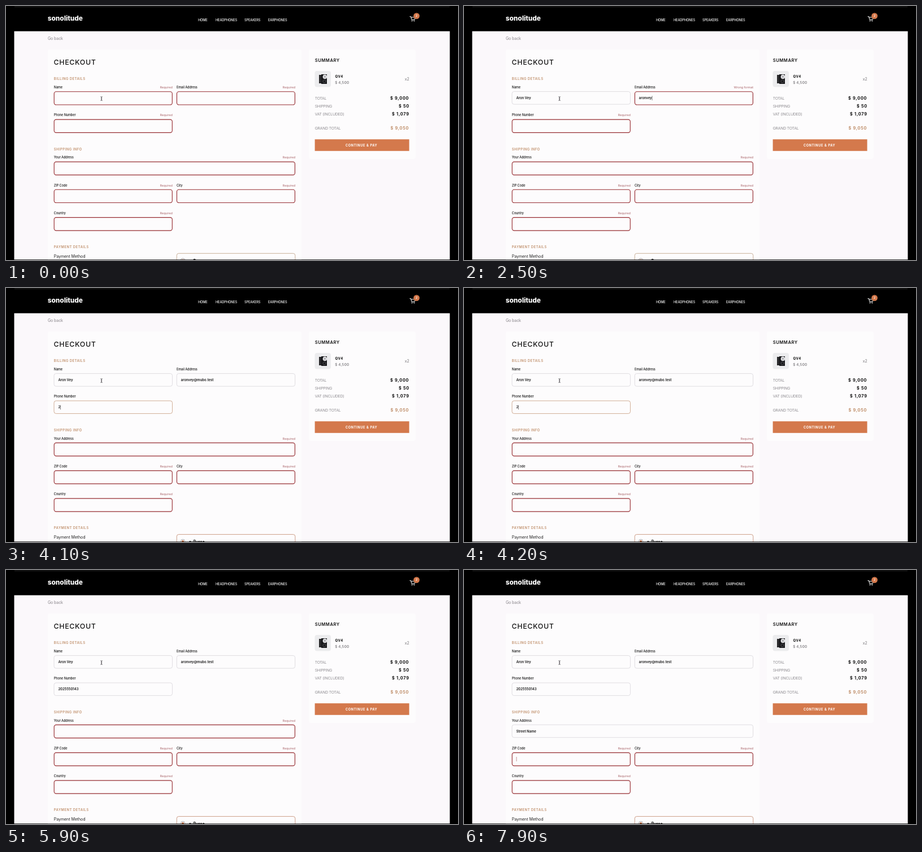
Write an HTML page that moves like this. It is 800 px wide and 450 px high and loops after 8000 ms.

```html
<!DOCTYPE html>
<html lang="en">
<head>
<meta charset="utf-8">
<title>Checkout form</title>
<style>
  html, body { margin: 0; width: 100%; height: 100%; overflow: hidden; background: #000; }
  svg { display: block; width: 800px; height: 450px; }
  text { font-family: Inter, "Open Sans", sans-serif; white-space: pre; }
  .nav { font-size: 5.6px; font-weight: 500; letter-spacing: -.08px; fill: #fff; }
  .brand { font-size: 11.8px; font-weight: 800; fill: #fff; }
  .back { font-size: 7px; letter-spacing: -.1px; fill: #858287; }
  .title { font-size: 12.3px; font-weight: 500; letter-spacing: .72px; fill: #111; }
  .section { font-size: 5.9px; font-weight: 600; letter-spacing: .48px; fill: #c0906c; }
  .label { font-size: 5.5px; font-weight: 500; letter-spacing: -.05px; fill: #111; }
  .error { font-size: 5.4px; letter-spacing: -.04px; fill: #aa666a; text-anchor: end; }
  .value { font-size: 5.9px; font-weight: 600; fill: #141414; }
  .method { font-size: 7px; letter-spacing: -.03px; fill: #222; }
  .option { font-size: 7.2px; font-weight: 700; fill: #111; }
  .head { font-size: 7.6px; font-weight: 600; letter-spacing: .55px; fill: #111; }
  .item { font-size: 6px; font-weight: 700; letter-spacing: .6px; fill: #111; }
  .price { font-size: 6.2px; font-weight: 600; letter-spacing: .25px; fill: #858387; }
  .count { font-size: 7px; fill: #77757a; }
  .row { font-size: 6.8px; font-weight: 300; letter-spacing: -.13px; fill: #6f6d72; }
  .sum { font-size: 7.4px; font-weight: 700; letter-spacing: .7px; fill: #111; }
  .grand { fill: #c0906c; }
  .pay { font-size: 5.7px; font-weight: 700; letter-spacing: .6px; fill: #fff; }
  .badge { font-size: 5px; font-weight: 600; fill: #fff; text-anchor: middle; }
</style>
</head>
<body>
<svg id="stage" viewBox="0 0 800 450"></svg>
<script>
const LOOP = 8000, SHIFT_AT = 4000, FADE = 150;
const RED = [150, 44, 49], ORANGE = [194, 148, 116], GREY = [214, 211, 217];
const stage = document.getElementById('stage');

function add(tag, attrs, parent = stage) {
  const el = document.createElementNS('http://www.w3.org/2000/svg', tag);
  for (const key in attrs) el.setAttribute(key, attrs[key]);
  return parent.appendChild(el);
}
function box(x, y, width, height, fill, rx = 0, parent = stage) {
  return add('rect', { x, y, width, height, fill, rx }, parent);
}
function write(cls, x, y, str, parent = stage) {
  const el = add('text', { class: cls, x, y }, parent);
  el.textContent = str;
  return el;
}
function dot(cx, cy, r, fill, parent = stage) {
  return add('circle', { cx, cy, r, fill }, parent);
}

// page and header
box(0, 0, 800, 450, '#000');
box(15, 1, 770, 1, '#242424');
box(14.5, 44.7, 771, 405, '#fbf8fb');
write('brand', 73.8, 26.2, 'sonolitude');
[[340, 'HOME'], [371, 'HEADPHONES'], [422, 'SPEAKERS'], [464, 'EARPHONES']]
  .forEach(([x, s]) => write('nav', x, 26.7, s));
add('path', { d: 'M714.5 18.6h1.9l1.6 5.8h5l1.2-4.4h-7.4', fill: 'none', stroke: '#fff', 'stroke-width': 1 });
dot(718.6, 26.4, .9, '#fff');
dot(722.4, 26.4, .9, '#fff');
dot(726.6, 17.6, 5.4, '#d4794c');
write('badge', 726.6, 19.4, '2');
write('back', 74, 60, 'Go back');

// cards
box(74, 77, 449, 380, '#fdfcfd', 4);
box(536, 77, 189, 194, '#fdfcfd', 4);
write('title', 84.6, 104, 'CHECKOUT');
write('section', 84.8, 131.4, 'BILLING DETAILS');

// summary
write('head', 546.7, 99, 'SUMMARY');
box(546.5, 115, 28.5, 28.5, '#ececee', 4);
box(554, 122, 5, 15, '#2a2a2d');
box(558, 121, 10, 17, '#17171a');
dot(564.4, 125.4, 3.8, '#dcdcdf');
dot(564.4, 125.4, 1.2, '#8a8a8f');
dot(563.4, 133.4, 3.2, '#38383c');
dot(563.4, 133.4, 1.3, '#0c0c0e');
write('item', 582.4, 127, 'QV4');
write('price', 582.2, 137.6, '$ 4,500');
write('count', 705.8, 132.2, 'x2');
[['TOTAL', 165.6, 680, '$ 9,000'], ['SHIPPING', 179.8, 695, '$ 50'],
 ['VAT (INCLUDED)', 193.8, 683, '$ 1,079'], ['GRAND TOTAL', 218.8, 680.4, '$ 9,050']]
  .forEach(([name, y, x, sum], i) => {
    write('row', 546.7, y, name);
    write(i === 3 ? 'sum grand' : 'sum', x, y + .6, sum);
  });
box(546.6, 236.2, 167, 20.6, '#d4794c');
write('pay', 601, 248.6, 'CONTINUE & PAY');

// parts that move up once the first row is valid
const phoneRow = add('g', {}), lower = add('g', {});
write('section', 84.8, 255.6, 'SHIPPING INFO', lower);
write('section', 84.8, 429.2, 'PAYMENT DETAILS', lower);
write('method', 84.8, 445.5, 'Payment Method', lower);
const option = add('rect', { x: 302.2, y: 438.3, width: 209.6, height: 30, rx: 3.5,
  fill: 'none', 'stroke-width': .8 }, lower);
add('circle', { cx: 313, cy: 451, r: 4, fill: 'none', stroke: '#8f8a8c', 'stroke-width': .7 }, lower);
dot(313, 451, 2.2, '#b9683f', lower);
write('option', 323.8, 453.6, 'e-Purse', lower);

const LEFT = 84.6, MID = 301.8, HALF = 210.2, FULL = 427.4;
// focus: [from, to]; blink: time the caret first lights; steps: [time, typed text]
const fields = [
  { label: 'Name', x: LEFT, y: 151.2, w: HALF, focus: [150, 1800], blink: 150, valid: 900,
    steps: [[900, 'a'], [1100, ''], [1200, 'A'], [1400, 'Ar'], [1500, 'Aron'],
            [1600, 'Aron V'], [1700, 'Aron Vey']] },
  { label: 'Email Address', x: MID, y: 151.2, w: HALF, focus: [1800, 3400], blink: 1800, valid: 3200,
    steps: [[2000, 'a'], [2100, 'ar'], [2200, 'aro'], [2300, 'aronv'], [2400, 'aronve'],
            [2500, 'aronvey'], [2700, 'aronvey@'], [2800, 'aronvey@m'], [2900, 'aronvey@mu'],
            [3000, 'aronvey@mubo'], [3100, 'aronvey@mubo.'], [3200, 'aronvey@mubo.te'],
            [3300, 'aronvey@mubo.test']] },
  { label: 'Phone Number', x: LEFT, y: 200.5, w: HALF, focus: [3450, 5300], blink: 3450, valid: SHIFT_AT,
    group: phoneRow,
    steps: [[4000, '2'], [4300, '20'], [4400, '202'], [4600, '2025'], [4700, '20255'],
            [4800, '202555'], [4900, '2025550'], [5000, '20255501'], [5100, '2025550143']] },
  { label: 'Your Address', x: LEFT, y: 275.5, w: FULL, focus: [5450, 7600], blink: 5450, valid: 6900,
    group: lower,
    steps: [[6900, 'S'], [7000, 'Str'], [7100, 'Stre'], [7200, 'Street'], [7300, 'Street N'],
            [7400, 'Street Name']] },
  { label: 'ZIP Code', x: LEFT, y: 324.7, w: HALF, focus: [7750, LOOP], blink: 7750, group: lower },
  { label: 'City', x: MID, y: 324.7, w: HALF, group: lower },
  { label: 'Country', x: LEFT, y: 374, w: HALF, group: lower }
];

for (const f of fields) {
  f.group = f.group || stage;
  f.steps = f.steps || [];
  f.focus = f.focus || [Infinity, Infinity];
  f.valid = f.valid || Infinity;
  write('label', f.x + .2, f.y - 5.1, f.label, f.group);
  f.error = write('error', f.x + f.w, f.y - 5.1, 'Required', f.group);
  f.frame = add('rect', { rx: 3.6, fill: 'none' }, f.group);
  f.value = write('value', f.x + 7.8, f.y + 13.9, '', f.group);
  f.caret = box(0, f.y + 8, .7, 8, '#555', 0, f.group);
}

// text cursor and lower edge
add('path', { d: 'M167.3 160.6q1.7 0 1.7 1v5q0 1 -1.7 1M170.7 160.6q-1.7 0 -1.7 1v5q0 1 1.7 1',
  fill: 'none', stroke: '#4a484c', 'stroke-width': .8 });
box(0, 449.3, 800, 1, '#000');

function mix(a, b, k) {
  k = Math.max(0, Math.min(1, k));
  return 'rgb(' + a.map((v, i) => Math.round(v + (b[i] - v) * k)).join() + ')';
}

function drawField(f, t) {
  const bad = t < f.valid;
  const line = bad ? 1.15 : .75;
  const set = { x: f.x + line / 2, y: f.y + line / 2, width: f.w - line,
    height: (bad ? 24.4 : 23.3) - line, 'stroke-width': line };
  for (const key in set) f.frame.setAttribute(key, set[key]);
  const [from, to] = f.focus;
  f.frame.setAttribute('stroke', t < to
    ? mix(RED, ORANGE, bad ? 0 : (t - f.valid + 60) / FADE)
    : mix(ORANGE, GREY, (t - to + 60) / FADE));

  let typed = '';
  for (const [time, str] of f.steps) if (t >= time) typed = str;
  f.value.textContent = typed;
  f.error.textContent = !bad ? '' : typed ? 'Wrong format' : 'Required';

  const typing = f.steps.length && t >= f.steps[0][0];
  const lit = t >= from && t < to && (typing || Math.floor((t - f.blink) / 250) % 2 === 0);
  f.caret.setAttribute('opacity', lit ? 1 : 0);
  if (lit) {
    f.caret.setAttribute('x', f.x + 8 + (typed ? f.value.getComputedTextLength() : 0));
    f.caret.setAttribute('fill', bad && !typed ? '#a86468' : '#555');
  }
}

function draw(t) {
  const up = t >= SHIFT_AT;
  phoneRow.setAttribute('transform', `translate(0 ${up ? -1 : 0})`);
  lower.setAttribute('transform', `translate(0 ${up ? -1.7 : 0})`);
  option.setAttribute('stroke', up ? '#c0866a' : '#bb9c80');
  fields.forEach(f => drawField(f, t));
}

const start = performance.now();
function tick() {
  draw((performance.now() - start) % LOOP);
  requestAnimationFrame(tick);
}
tick();
</script>
</body>
</html>
```
